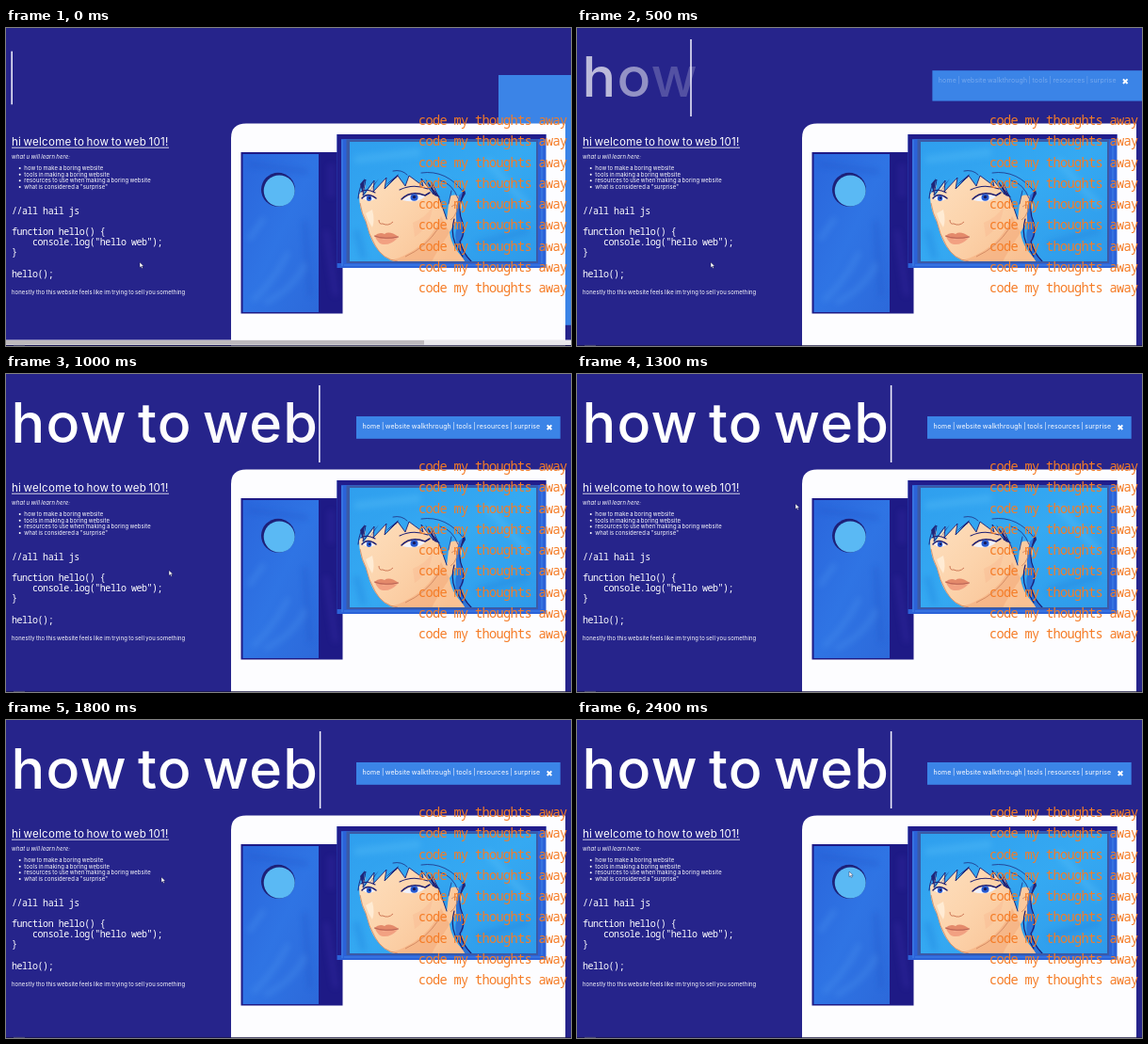
Animation of 600x338 px, one loop 2500 ms. Source, as an HTML page:

```html
<!DOCTYPE html>
<html lang="en">
<head>
<meta charset="utf-8">
<title>how to web</title>
<style>
  html, body { margin: 0; width: 100%; height: 100%; overflow: hidden; background: #26248b; }
  svg { display: block; width: 600px; height: 338px; }
  text {
    fill: #fff; white-space: pre; font-family: Inter, "Open Sans", sans-serif;
    font-optical-sizing: none; letter-spacing: .02em; word-spacing: -.09em;
  }
  .title { font-size: 59.3px; font-weight: 500; word-spacing: -.1em; }
  .heading { font-size: 11.6px; }
  .small { font-size: 5.9px; }
  .menu { font-size: 6.95px; }
  .code, .echo text { font-family: "Noto Sans Mono", "DejaVu Sans Mono", monospace; word-spacing: 0; }
  .code { font-size: 10px; letter-spacing: -.48px; }
  .echo text { font-size: 13.6px; letter-spacing: -.66px; fill: #f57c26; }
  .close { font: 9px "DejaVu Sans", sans-serif; }
  .ink { fill: none; stroke: #1c1d72; stroke-linecap: round; stroke-linejoin: round; }
</style>
</head>
<body>
<svg viewBox="0 0 600 338">
  <defs>
    <linearGradient id="card" x2="1" y2="1">
      <stop offset="0" stop-color="#2a66dc"/>
      <stop offset=".5" stop-color="#2f74e4"/>
      <stop offset="1" stop-color="#2c69da"/>
    </linearGradient>
    <linearGradient id="sky" x2="1" y2="1">
      <stop offset="0" stop-color="#2f9fee"/>
      <stop offset=".5" stop-color="#35a9f2"/>
      <stop offset="1" stop-color="#2e9aea"/>
    </linearGradient>
    <linearGradient id="skin" x2="1" y2=".7">
      <stop offset="0" stop-color="#fde0c0"/>
      <stop offset=".5" stop-color="#fcd3ab"/>
      <stop offset="1" stop-color="#f9c193"/>
    </linearGradient>
    <filter id="soft"><feGaussianBlur stdDeviation="3"/></filter>
    <clipPath id="canvas"><path d="M365 121H563V248H365Z"/></clipPath>
  </defs>

  <rect width="600" height="338" fill="#26248b"/>
  <rect id="navBox" fill="#3b84e7"/>

  <path d="M239 338V117Q239 101.5 255 101.5H594V338Z" fill="#fdfdff"/>

  <!-- door panel -->
  <rect x="249.5" y="132" width="108" height="171.5" fill="#1e1a86"/>
  <rect x="251.5" y="134" width="80.5" height="168" fill="url(#card)"/>
  <g filter="url(#soft)" fill="none" stroke-width="5" opacity=".3">
    <path d="M262 290Q285 268 300 238M275 292Q305 278 318 250M258 225L274 202" stroke="#55a0f5"/>
    <path d="M258 145L321 153M317 205L323 285" stroke="#1c50c4"/>
    <path d="M345 145V180M340 215L350 285" stroke="#4639b8"/>
  </g>
  <circle cx="289" cy="171.8" r="18" fill="#1d2078"/>
  <circle cx="290.2" cy="173" r="16.5" fill="#5ab9f4"/>

  <!-- portrait -->
  <rect x="351.5" y="113" width="222" height="142" fill="#2b62d8"/>
  <path d="M351.5 113H573.5V118H356V250H351.5Z" fill="#211d8c"/>
  <path d="M357 119V253M359 252H571M569 121V250" fill="none" stroke="#3b7be4" stroke-width="2" opacity=".7"/>
  <path d="M361.5 118.5H565V250H361.5Z" fill="#3b5aa6"/>
  <rect x="365" y="121" width="198" height="127" fill="url(#sky)"/>
  <g clip-path="url(#canvas)">
    <g filter="url(#soft)" fill="none" stroke-width="8" opacity=".3">
      <path d="M370 140L440 132M510 140L555 190" stroke="#60c5fa"/>
      <path d="M500 230L555 215M372 215L380 245" stroke="#1e78d8"/>
    </g>
    <path d="M375 176C376 164 390 154 412 152L456 158C464 174 466 188 473 178C484 174 488 190 479 204L471 217C473 232 481 241 491 249H418C408 248 400 243 395 236C387 226 385 216 382 206C377 196 375 187 375 176Z" fill="url(#skin)"/>
    <path d="M462 200C456 217 444 231 426 240C418 245 411 246 406 247L424 249H452C458 236 465 228 471 217Z" fill="#f4aa78" opacity=".55"/>
    <path d="M432 207Q446 201 453 190Q451 211 434 222Z" fill="#f9bb92" opacity=".45"/>
    <path d="M389 193Q392 205 389 212Q384 205 382 197Z" fill="#fff0dc" opacity=".8"/>

    <!-- hair -->
    <path d="M372 182C373 160 388 147 412 145C448 140 482 151 489 178L486 176Q478 166 473 173L470 187L468 204L461 183L452 164L454 177L441 160L443 168L428 157L424 168L416 157L402 171L404 159L390 174L391 163L379 180L382 166Z" fill="url(#sky)"/>
    <path d="M487 172Q478 192 485 207Q489 218 483 228Q486 240 495 249H488Q473 228 479 212Q476 194 481 178Z" fill="#2b74d6"/>
    <g class="ink" stroke-width=".9">
      <path d="M374 181C375 171 377 166 382 161L379 178L391 162L390 174L404 159L402 171L416 157L424 168L428 157L443 168L441 160L454 177L452 164L461 183L468 203"/>
      <path d="M411 152Q420 150 426 156M441 154Q468 150 487 176M461 162Q474 165 480 181M470 187L473 173" stroke-width=".7"/>
      <path d="M487 174Q478 192 485 207Q488 217 482 227Q485 239 494 248M476 203Q472 217 477 229L485 243" stroke-width="1.2"/>
    </g>
    <path d="M376 166L381 160L379 176ZM386 174L396 160L391 166ZM403 167L417 155L415 159ZM455 178L445 160L461 180ZM482 187L488 176L486 170Z" fill="#202477"/>

    <!-- face -->
    <g class="ink" stroke-width="1.5">
      <path d="M377 174Q383 170 392 175M418 172Q432 165 448 171" stroke-width="1.1"/>
      <path d="M378 181Q384 174 393 181M420 182Q430 172 445 178L450 175"/>
    </g>
    <path d="M379 181Q385 176 392 182Q384 186 379 181ZM421 183Q431 174 445 179Q437 187 421 183Z" fill="#eef1ff"/>
    <ellipse cx="385.5" cy="181" rx="2.7" ry="2.9" fill="#2558cf"/>
    <ellipse cx="433.5" cy="180" rx="4" ry="3.8" fill="#2558cf"/>
    <circle cx="386" cy="180.8" r="1.2" fill="#171958"/>
    <circle cx="433.5" cy="179.6" r="1.7" fill="#171958"/>
    <path d="M396 204Q396 209 400 208Q406 211 411 206" fill="none" stroke="#c96f4d" stroke-width=".9"/>
    <path d="M391 221Q397 216 402 219Q407 215 417 222Q409 226 401 224Q395 225 391 221Z" fill="#e48a6b"/>
    <path d="M392 222Q400 226 416 223Q409 231 400 230Q395 229 392 222Z" fill="#f2a182"/>
    <path d="M391 221Q402 225 417 222" fill="none" stroke="#a4524c" stroke-width=".7"/>
    <path d="M376 186Q378 198 382 205Q385 219 392 231Q400 246 416 248M424 243Q446 233 459 213M473 190Q480 184 479 194Q476 202 472 204" fill="none" stroke="#c67a56" stroke-width=".7"/>
  </g>

  <g class="echo" id="echo"></g>

  <text class="heading" x="6" y="125.2">hi welcome to how to web 101!</text>
  <path d="M6 127.2H173" stroke="#fff" stroke-width=".8"/>
  <text class="small" x="6" y="138.8" font-style="italic">what u will learn here:</text>
  <g id="list"></g>
  <g class="code" id="code"></g>
  <text class="small" x="6" y="283.3">honestly tho this website feels like im trying to sell you something</text>

  <text class="title" id="title" x="5.6" y="73"></text>
  <rect id="caret" x="-.75" y="-41" width="1.5" height="82" fill="#f4f4ff"/>

  <g id="nav">
    <text class="menu" id="menu" x="378.5" y="58.4">home | website walkthrough | tools | resources | surprise</text>
    <text class="close" x="573.2" y="60.2">✖</text>
  </g>

  <g id="scrollbar">
    <rect y="331.5" width="600" height="5.5" fill="#e9e8ec"/>
    <rect id="thumb" y="332" height="4.6" fill="#bdb9bd"/>
  </g>
  <path d="M0 337.6H600" stroke="#17153f" stroke-width=".8"/>
  <path d="M8 337.4H20" stroke="#4a4a72"/>
  <path id="cursor" d="M0 0V5.6L1.4 4.4L2.4 6.5L3.3 6L2.4 4H4.2Z" fill="#fff" stroke="#15153f" stroke-width=".4"/>
</svg>
<script>
  const $ = id => document.getElementById(id);
  const LOOP = 2500, STEP = 100;

  function add(parent, name, attrs, content) {
    const el = document.createElementNS("http://www.w3.org/2000/svg", name);
    set(el, attrs);
    if (content) el.textContent = content;
    return parent.appendChild(el);
  }
  function set(el, attrs) {
    for (const key in attrs) el.setAttribute(key, attrs[key]);
  }

  for (let i = 0; i < 9; i++)
    add($("echo"), "text", { x: 438, y: 103 + i * 22.25 }, "code my thoughts away");

  ["how to make a boring website", "tools in making a boring website",
   "resources to use when making a boring website", 'what is considered a "surprise"'
  ].forEach((item, i) => {
    const y = 151 + i * 6.65;
    add($("list"), "circle", { cx: 14.7, cy: y - 2, r: 1, fill: "#fff" });
    add($("list"), "text", { class: "small", x: 19.3, y }, item);
  });

  ["//all hail js", "", "function hello() {", '    console.log("hello web");', "}", "", "hello();"
  ].forEach((line, i) => {
    const text = line.trimStart();
    const x = 6 + (line.length - text.length) * 5.52;
    if (text) add($("code"), "text", { class: "code", x, y: 198.2 + i * 11.07 }, text);
  });

  // Spaces keep their place but take no turn in the stagger.
  const letters = [];
  for (const char of "how to web") {
    const span = add($("title"), "tspan", {}, char);
    if (char !== " ") letters.push(span);
  }

  const clamp = v => Math.min(1, Math.max(0, v));
  const outExpo = u => u <= 0 ? 0 : u >= 1 ? 1 : 1 - 2 ** (-10 * u);
  const smooth = u => u * u * (3 - 2 * u);

  // time, x, y
  const path = [[0, 142, 249], [700, 142, 249], [800, 141, 247], [1300, 232, 138],
                [1800, 165, 167], [2400, 289, 161], [2500, 289, 161]];

  function cursorAt(t) {
    const i = path.findIndex(p => p[0] > t);
    const [a, b] = [path[i - 1], path[i]];
    const u = smooth((t - a[0]) / (b[0] - a[0]));
    return [1, 2].map(k => a[k] + (b[k] - a[k]) * u);
  }

  function draw(t) {
    // The menu slides in from the right while its box shrinks.
    const p = (1 - clamp(t / 745)) ** 3;
    const left = 372 + 151 * p, top = 45 + 5 * p;
    set($("navBox"), { x: left, y: top, width: 216.7 + 189 * p, height: 23.8 + 242 * p });
    set($("nav"), { transform: `translate(${151 * p})` });
    set($("menu"), { opacity: clamp((t - 440) / 200) });
    set($("scrollbar"), { visibility: t < 500 ? "visible" : "hidden" });
    set($("thumb"), { width: 600 - 156 * p * p });

    const grow = 1 - .31 * (1 - clamp(t / 300)) ** 2;
    const x = 6.2 + 327.4 * outExpo((t - 462) / 610);
    set($("caret"), { transform: `translate(${x} 53) scale(1 ${grow})` });
    letters.forEach((letter, i) =>
      set(letter, { "fill-opacity": outExpo((t - 400 - 40 * i) / 600) }));

    set($("cursor"), { transform: `translate(${cursorAt(t)})` });
  }

  const start = performance.now();
  function tick() {
    const t = (performance.now() - start) % LOOP;
    draw(Math.floor(t / STEP) * STEP);
    requestAnimationFrame(tick);
  }
  tick();
</script>
</body>
</html>
```
